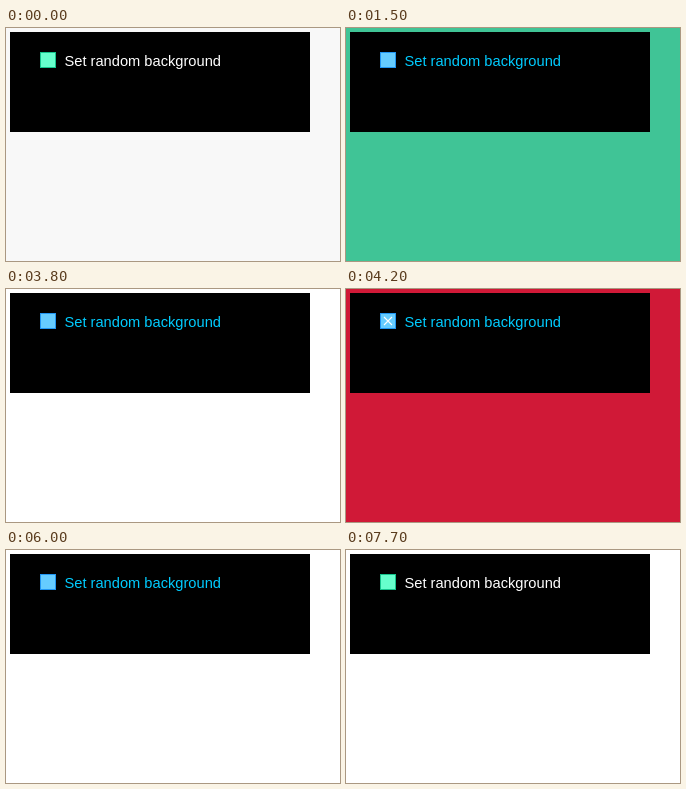
These frames come from a looping animation (334x233 px, 9 s). An HTML page:

```html
<!DOCTYPE html>
<html lang="en">
<head>
<meta charset="utf-8">
<title>Random background checkbox</title>
<style>
  html, body { margin: 0; width: 100%; height: 100%; overflow: hidden; }
  #panel { position: absolute; left: 4px; top: 4px; width: 300px; height: 100px; background: #000; }
  #box {
    position: absolute; left: 29px; top: 19px; width: 17px; height: 17px;
    --fill: #66ffcc; --edge: #14c48c;
  }
  #box rect { fill: var(--fill); stroke: var(--edge); }
  #box path { fill: none; stroke: #fff; stroke-width: 1.1; visibility: hidden; }
  #label {
    position: absolute; left: 54.5px; top: 20px; line-height: 18px; white-space: nowrap;
    font-family: "Liberation Sans", Arial, sans-serif; font-size: 11pt; color: #fff;
  }
  .hover #box { --fill: #66ccff; --edge: #2196f3; }
  .hover #label { color: #00ccff; }
  .checked #box path { visibility: visible; }
</style>
</head>
<body>
<div id="panel">
  <svg id="box" viewBox="0 0 17 17">
    <rect x="1.5" y="1.5" width="15" height="15"/>
    <path d="M5 5 L13 13 M13 5 L5 13"/>
  </svg>
  <span id="label">Set random background</span>
</div>
<script>
  const LOOP = 9000;
  const panel = document.getElementById("panel");

  // Each track lists [start time, value] pairs.
  const hovered = [[0, false], [1300, true], [2000, false], [2700, true], [3300, false],
    [3800, true], [4600, false], [5000, true], [5500, false], [6000, true],
    [6600, false], [7100, true], [7700, false]];
  const checked = [[0, false], [1600, true], [3000, false], [4200, true],
    [5300, false], [6400, true], [7500, false]];
  const background = [[0, "#f8f8f8"], [1500, "#40c496"], [2900, "#fff"], [4200, "#d01937"],
    [5300, "#fff"], [6400, "#8cff92"], [7500, "#fff"]];

  const valueAt = (track, time) => track.findLast(([start]) => start <= time)[1];

  function draw(now) {
    const time = Math.max(0, now) % LOOP;
    panel.classList.toggle("hover", valueAt(hovered, time));
    panel.classList.toggle("checked", valueAt(checked, time));
    document.body.style.background = valueAt(background, time);
  }

  const startTime = performance.now();
  function tick() {
    draw(performance.now() - startTime);
    requestAnimationFrame(tick);
  }
  tick();
</script>
</body>
</html>
```
